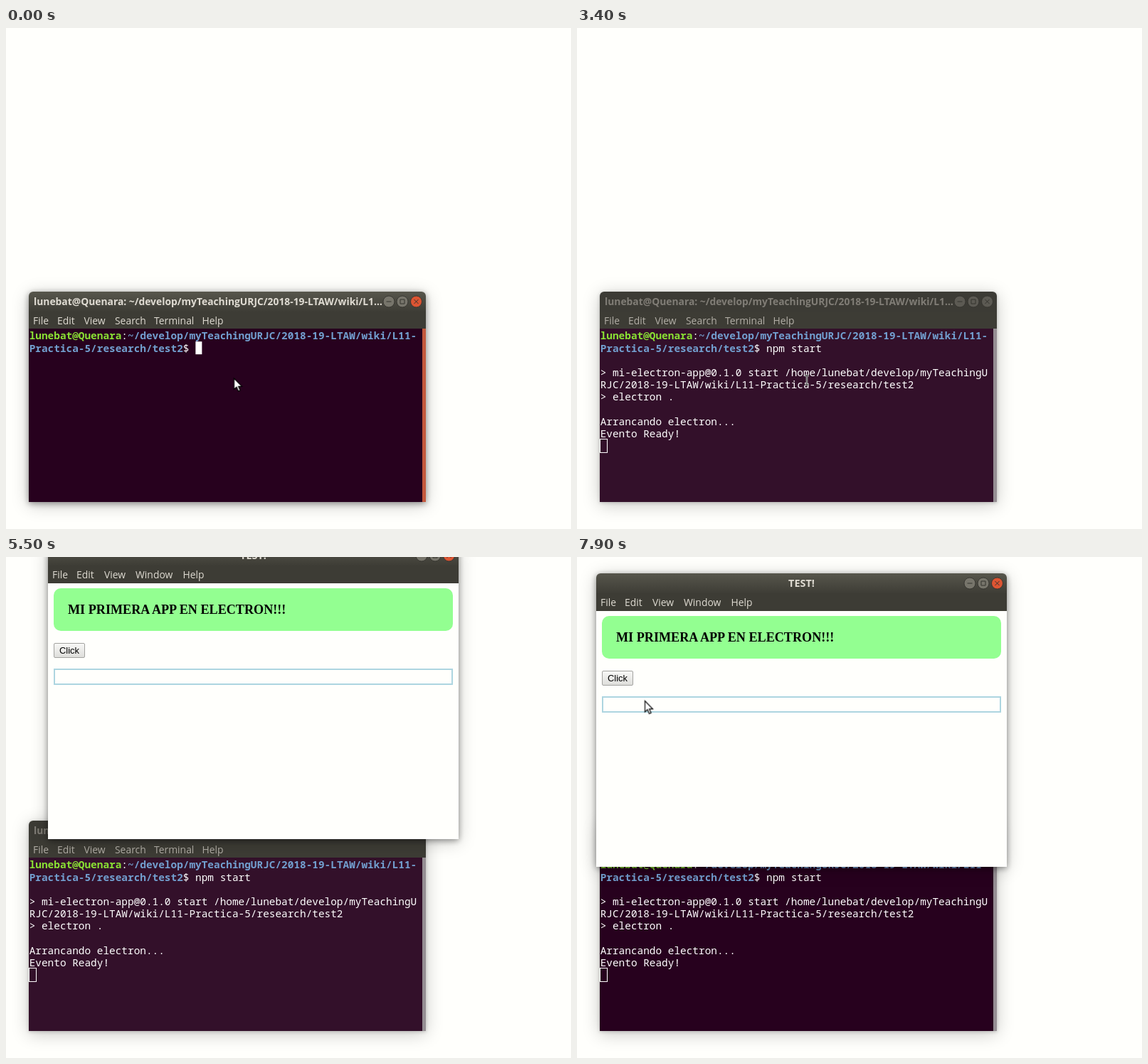
These frames come from a looping animation (794x705 px, 8 s). An HTML page:

```html
<!DOCTYPE html>
<html lang="es">
<head>
<meta charset="utf-8">
<title>Terminal y ventana</title>
<style>
html, body { margin: 0; width: 100%; height: 100%; overflow: hidden; background: #fffffc; }
body { position: relative; }
body * { box-sizing: border-box; }

.anim { animation: 8s step-end infinite; }

/* window chrome */
.win {
  position: absolute; border-radius: 6px 6px 0 0;
  --bar: linear-gradient(#57564c, #3e3d36); --title: #dfdbd2; --menu: #dfdbd2;
  --btn: #77756b; --close: #dd5533; --ink: #35342f;
  --shadow: 0 2px 8px rgba(0, 0, 0, .4);
  box-shadow: var(--shadow), 0 4px 24px rgba(0, 0, 0, .22);
  font: 13.9px "Open Sans", "Noto Sans", sans-serif;
}
.bar {
  height: 28px; line-height: 28px; border-radius: 6px 6px 0 0; white-space: nowrap;
  background: var(--bar); color: var(--title); font-weight: 700;
}
.menu { position: relative; height: 25px; background: #3d3c35; color: var(--menu); line-height: 25px; }
.menu span { position: absolute; }
.btns { position: absolute; right: 5px; top: 5px; width: 56px; height: 18px; }
.btns circle { fill: var(--btn); stroke: var(--ink); stroke-width: .9; }
.btns .x { fill: var(--close); }
.btns path { fill: none; stroke: var(--ink); stroke-width: 1; }

/* terminal */
#term { left: 32px; top: 371px; width: 558px; height: 296px; animation-name: focus; }
#term .bar { padding-left: 7px; font-size: 13.85px; }
#term .menu { height: 24px; }
#screen {
  position: absolute; inset: 52px 0 0; overflow: hidden; color: #fff;
  background: #27011e; animation-name: tint;
}
#screen::after { content: ""; position: absolute; right: 0; top: 0; bottom: 0; width: 5px; background: var(--scroll); }
#text {
  position: absolute; left: .7px; top: 1.4px; margin: 0;
  font: 14.41px/17.22px "Noto Sans Mono", "DejaVu Sans Mono", monospace;
}
#text b { color: #8ae234; }
#text .dir { color: #729fcf; }
#caret { position: absolute; left: 0; top: -.8px; width: 9px; height: 18px; background: #fff; animation-name: caret; }
.cmd { animation-name: cmd; }
.out { animation-name: out; }
.boot { animation-name: boot; }
.ready { animation-name: ready; }

@keyframes focus {
  0% { --scroll: #c4593d; }
  33.75%, 100% {
    --bar: #3c3b35; --title: #807d76; --menu: #b3afa7; --btn: #5c5a53; --close: #5c5a53;
    --scroll: #958e93; --shadow: 0 1px 5px rgba(0, 0, 0, .2);
  }
}
@keyframes tint {
  0% { background: #27011e; }
  33.75% { background: #33102a; }
  78.75%, 100% { background: #27011e; }
}
@keyframes cmd { 0% { opacity: 0; } 18.75%, 100% { opacity: 1; } }
@keyframes out { 0% { opacity: 0; } 27.5%, 100% { opacity: 1; } }
@keyframes boot { 0% { opacity: 0; } 31.25%, 100% { opacity: 1; } }
@keyframes ready { 0% { opacity: 0; } 32.5%, 100% { opacity: 1; } }
@keyframes caret {
  0% { translate: 27ch 17.2px; opacity: 1; }
  5% { translate: 27ch 17.2px; opacity: 0; }
  7.5% { translate: 27ch 17.2px; opacity: 1; }
  18.75% { translate: 36ch 17.2px; opacity: 1; }
  20% { translate: 36ch 17.2px; opacity: 0; }
  22.5% { translate: 36ch 17.2px; opacity: 1; }
  25% { translate: 0 34.4px; }
  27.5% { translate: 0 120.5px; }
  31.25% { translate: 0 137.8px; }
  32.5% { translate: 0 155px; background: #fff; outline: 0 solid #fff; }
  33.75%, 100% { translate: 0 155px; background: transparent; outline: 1px solid #fff; }
}

/* app window */
#app { left: 0; top: 0; width: 577px; height: 413px; background: #fffffc; animation-name: drag; }
#app .bar { text-align: center; font-size: 14.4px; }
#app .page > * { position: absolute; left: 8px; }
h3 {
  top: 60px; width: 561px; height: 60px; margin: 0; padding-left: 20px;
  border-radius: 10px; background: #93ff91; color: #000;
  font: 700 18.15px/60px "Liberation Serif", serif;
}
.click {
  top: 137px; width: 44px; height: 21px; border: 1px solid #a3a3a0; border-radius: 2px;
  background: linear-gradient(#f8f8f6, #dededb); color: #000; text-align: center;
  font: 12.9px/19px "Liberation Sans", sans-serif;
}
.field { top: 173px; width: 561px; height: 23px; border: 2px solid #add5e0; }

@keyframes drag {
  0% { translate: -110px -900px; }
  60% { translate: -110px -397px; }
  61.25% { translate: -60px -320px; }
  62.5% { translate: -15px -240px; }
  63.75% { translate: 20px -165px; }
  65% { translate: 42px -105px; }
  66.25% { translate: 54px -62px; }
  67.5% { translate: 59px -34px; }
  68.75% { translate: 59px -16px; }
  70% { translate: 53px -6px; }
  71.25% { translate: 51px 0; }
  72.5% { translate: 48px 6px; }
  73.75% { translate: 46px 11px; }
  75% { translate: 42px 16px; }
  76.25% { translate: 38px 21px; }
  77.5% { translate: 35px 25px; }
  78.75% { translate: 32px 29px; }
  82.5% { translate: 31px 30px; }
  83.75% { translate: 30px 29px; }
  85% { translate: 29px 27px; }
  86.25% { translate: 28px 25px; }
  87.5%, 100% { translate: 27px 23px; }
}

/* pointers */
.ptr { position: absolute; left: 0; top: 0; overflow: visible; }
#arrow { animation-name: arrow; }
#beam { animation-name: beam; translate: 319px 488px; }
#fist { animation-name: fist; }

@keyframes arrow {
  0% { translate: 320.5px 493px; }
  2.5% { translate: -50px -50px; }
  92.5% { translate: 280px 42px; }
  93.75% { translate: 285px 48px; }
  95% { translate: 289px 52px; }
  97.5% { translate: 190px 128px; }
  98.75%, 100% { translate: 95.5px 202.5px; }
}
@keyframes beam {
  0% { opacity: 0; }
  2.5% { opacity: 1; }
  7.5% { opacity: 0; }
  42.5% { opacity: 1; }
  43.75%, 100% { opacity: 0; }
}
@keyframes fist {
  0% { translate: -50px -50px; }
  71.25% { translate: 306px 15px; }
  72.5% { translate: 303px 21px; }
  73.75% { translate: 301px 27px; }
  75% { translate: 297px 33px; }
  76.25% { translate: 293px 38px; }
  77.5% { translate: 289px 43px; }
  78.75% { translate: 285px 49px; }
  82.5% { translate: 283px 51px; }
  83.75% { translate: 282px 50px; }
  85% { translate: 281px 47px; }
  86.25% { translate: 280px 45px; }
  87.5% { translate: 280px 43px; }
  92.5%, 100% { translate: -50px -50px; }
}
</style>
</head>
<body>

<div id="term" class="win anim">
  <div class="bar">lunebat@Quenara: ~/develop/myTeachingURJC/2018-19-LTAW/wiki/L1…</div>
  <svg class="btns" viewBox="0 0 56 18">
    <circle cx="9" cy="9" r="8"/><circle cx="28" cy="9" r="8"/><circle class="x" cx="47.5" cy="9" r="8"/>
    <path d="M5.5 9h7M25 6h6v6h-6zM44.5 6l6 6m0-6l-6 6"/>
  </svg>
  <div class="menu">
    <span style="left:6px">File</span><span style="left:40px">Edit</span><span style="left:77.5px">View</span>
    <span style="left:121px">Search</span><span style="left:176px">Terminal</span><span style="left:243.5px">Help</span>
  </div>
  <div id="screen" class="anim">
<pre id="text"><b>lunebat@Quenara</b>:<b class="dir">~/develop/myTeachingURJC/2018-19-LTAW/wiki/L11-
Practica-5/research/test2</b>$ <span class="cmd anim">npm start</span>

<span class="out anim">&gt; mi-electron-app@0.1.0 start /home/lunebat/develop/myTeachingU
RJC/2018-19-LTAW/wiki/L11-Practica-5/research/test2
&gt; electron .</span>

<span class="boot anim">Arrancando electron...</span>
<span class="ready anim">Evento Ready!</span>
<i id="caret" class="anim"></i></pre>
  </div>
</div>

<div id="app" class="win anim">
  <div class="bar">TEST!</div>
  <svg class="btns" viewBox="0 0 56 18">
    <circle cx="9" cy="9" r="8"/><circle cx="28" cy="9" r="8"/><circle class="x" cx="47.5" cy="9" r="8"/>
    <path d="M5.5 9h7M25 6h6v6h-6zM44.5 6l6 6m0-6l-6 6"/>
  </svg>
  <div class="menu">
    <span style="left:6px">File</span><span style="left:40px">Edit</span><span style="left:79px">View</span>
    <span style="left:123px">Window</span><span style="left:189.5px">Help</span>
  </div>
  <div class="page">
    <h3>MI PRIMERA APP EN ELECTRON!!!</h3>
    <div class="click">Click</div>
    <div class="field"></div>
  </div>
</div>

<svg id="beam" class="ptr anim" width="8" height="15">
  <path d="M1 1h6M4 1v13M1 14h6" fill="none" stroke="#fff" stroke-width="2.4"/>
  <path d="M1 1h6M4 1v13M1 14h6" fill="none" stroke="#000"/>
</svg>
<svg id="fist" class="ptr anim" width="1" height="1">
  <path d="M-4.5 6V4L-7 1.5V-1L-4.5 -1.5V-4Q-3 -6 -1.5 -4.5Q0 -6 1.5 -4.5Q3 -5.5 4.5 -4Q7 -4 7 -1.5V2L5.5 4V6Z" fill="#fff" stroke="#000" stroke-width="1.2"/>
  <path d="M-1.5 -3v2M1.5 -3v2M4.5 -3v2" stroke="#000" stroke-width=".9"/>
</svg>
<svg id="arrow" class="ptr anim" width="1" height="1">
  <path d="M0 0V15.5L3.6 12.2L6 18L8.6 16.9L6.2 11.3H11Z" fill="#fff" stroke="#000" stroke-width="1.2"/>
</svg>

</body>
</html>
```
